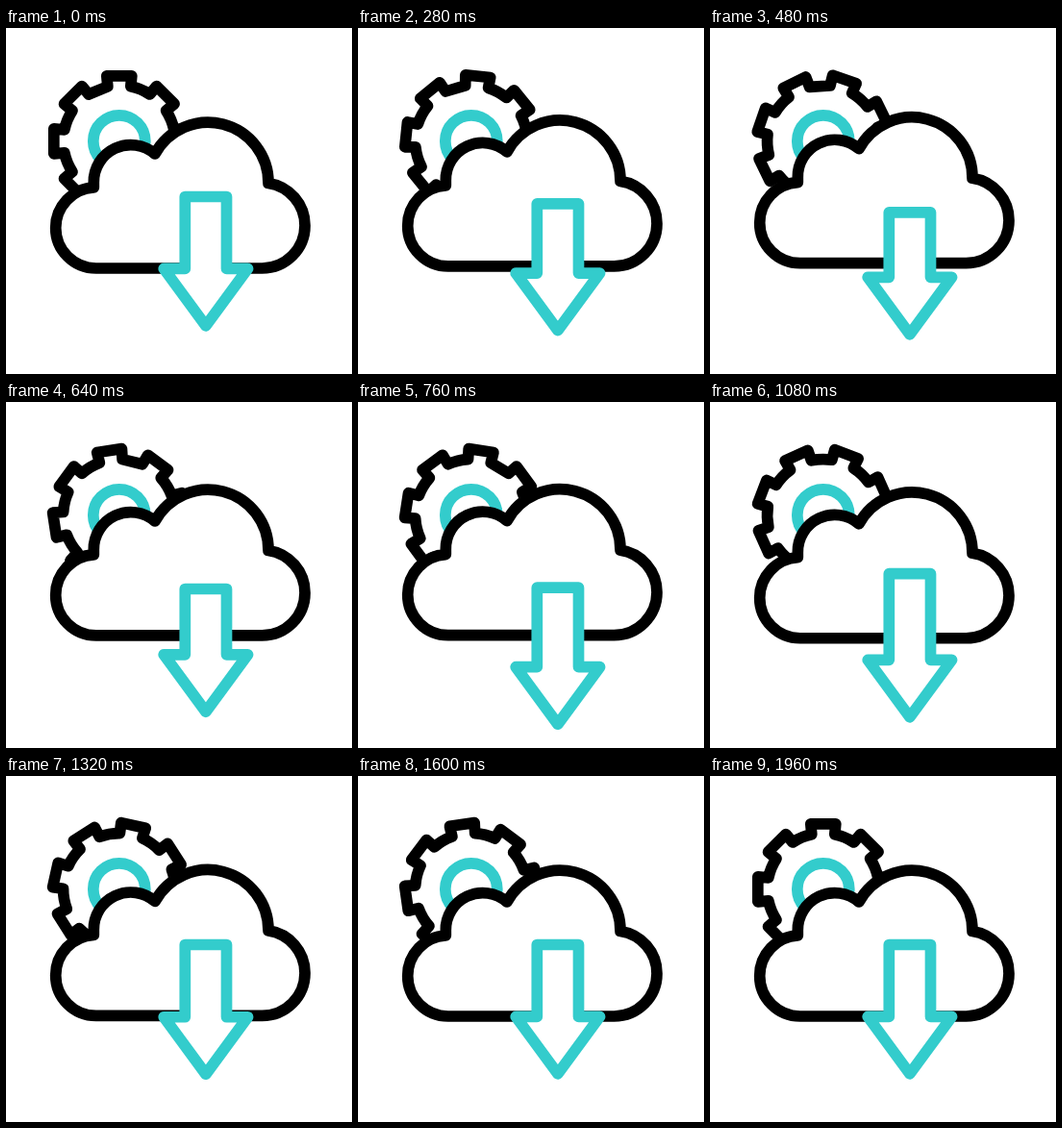
An HTML page that plays this animation: 360 by 360 pixels, repeating every 2 s.

```html
<!DOCTYPE html>
<html lang="en">
<head>
<meta charset="utf-8">
<title>Cloud download</title>
<style>
  html, body { margin: 0; width: 100%; height: 100%; overflow: hidden; background: #fff; }
  svg { display: block; width: 100vw; height: 100vh; }
  path, circle { fill: #fff; stroke: #000; stroke-width: 11.7; stroke-linejoin: round; stroke-linecap: round; }
  .accent { stroke: #33cccc; }
</style>
</head>
<body>
<svg viewBox="0 0 360 360">
  <g transform="translate(117.8 117.8)">
    <path id="gear"/>
    <circle class="accent" r="27"/>
  </g>
  <path id="cloud" d="M93.7 250 A42 42 0 0 1 51.7 208 A42 42 0 0 1 91.3 166 V161
    A38.5 38.5 0 0 1 155 131 A62.8 62.8 0 0 1 273 161.5
    A44.5 44.5 0 0 1 311 205.5 A44.5 44.5 0 0 1 266.5 250 Z"/>
  <path id="arrow" class="accent"/>
</svg>
<script>
  const LOOP = 2000;
  const [gear, cloud, arrow] = ['gear', 'cloud', 'arrow'].map(id => document.getElementById(id));

  // Cubic Bezier easing with end heights 0 and 1, solved by bisection.
  function bezier(x1, x2) {
    return x => {
      let lo = 0, hi = 1;
      for (let i = 0; i < 24; i++) {
        const s = (lo + hi) / 2, r = 1 - s;
        if (3 * r * r * s * x1 + 3 * r * s * s * x2 + s ** 3 < x) lo = s; else hi = s;
      }
      return lo * lo * (3 - 2 * lo);
    };
  }
  const easeInOut = bezier(0.42, 0.58);
  const spin = bezier(0.5, 0.51);

  // Eased value at time t along [time, value] keys.
  function track(keys, t, ease = easeInOut) {
    for (let i = 1; i < keys.length; i++) {
      const [t0, v0] = keys[i - 1], [t1, v1] = keys[i];
      if (t < t1) return v0 + (v1 - v0) * ease((t - t0) / (t1 - t0));
    }
    return keys[keys.length - 1][1];
  }

  const TURN = [[0, 0], [1920, 180]];
  const BOB = [[0, 0], [760, -7.4], [1460, 0]];
  const TAIL = [[0, 0], [650, 19], [1250, 0]];
  const HEAD = [[0, 0], [560, 9.3], [860, 30], [1360, 0]];

  function gearPath(teeth) {
    const tooth = [[-12, -57], [-13, -68], [13, -68], [12, -57]];
    let d = '';
    for (let i = 0; i < teeth; i++) {
      const a = i * 2 * Math.PI / teeth, c = Math.cos(a), s = Math.sin(a);
      tooth.forEach(([x, y], k) => {
        const cmd = k ? 'L' : i ? 'A58 58 0 0 1 ' : 'M';
        d += `${cmd}${(x * c - y * s).toFixed(2)} ${(x * s + y * c).toFixed(2)}`;
      });
    }
    return d + 'Z';
  }

  function arrowPath(tail, head) {
    const top = 175.5 + tail, neck = 250.4 + head;
    return `M186.3 ${top}H229.5V${neck}H251.6L207.9 ${neck + 59.5}L164.2 ${neck}H186.3Z`;
  }

  function draw() {
    const t = performance.now() % LOOP;
    gear.setAttribute('transform', `rotate(${track(TURN, t, spin)})`);
    cloud.setAttribute('transform', `translate(0 ${track(BOB, t)})`);
    arrow.setAttribute('d', arrowPath(track(TAIL, t), track(HEAD, t)));
    requestAnimationFrame(draw);
  }

  gear.setAttribute('d', gearPath(8));
  draw();
</script>
</body>
</html>
```
